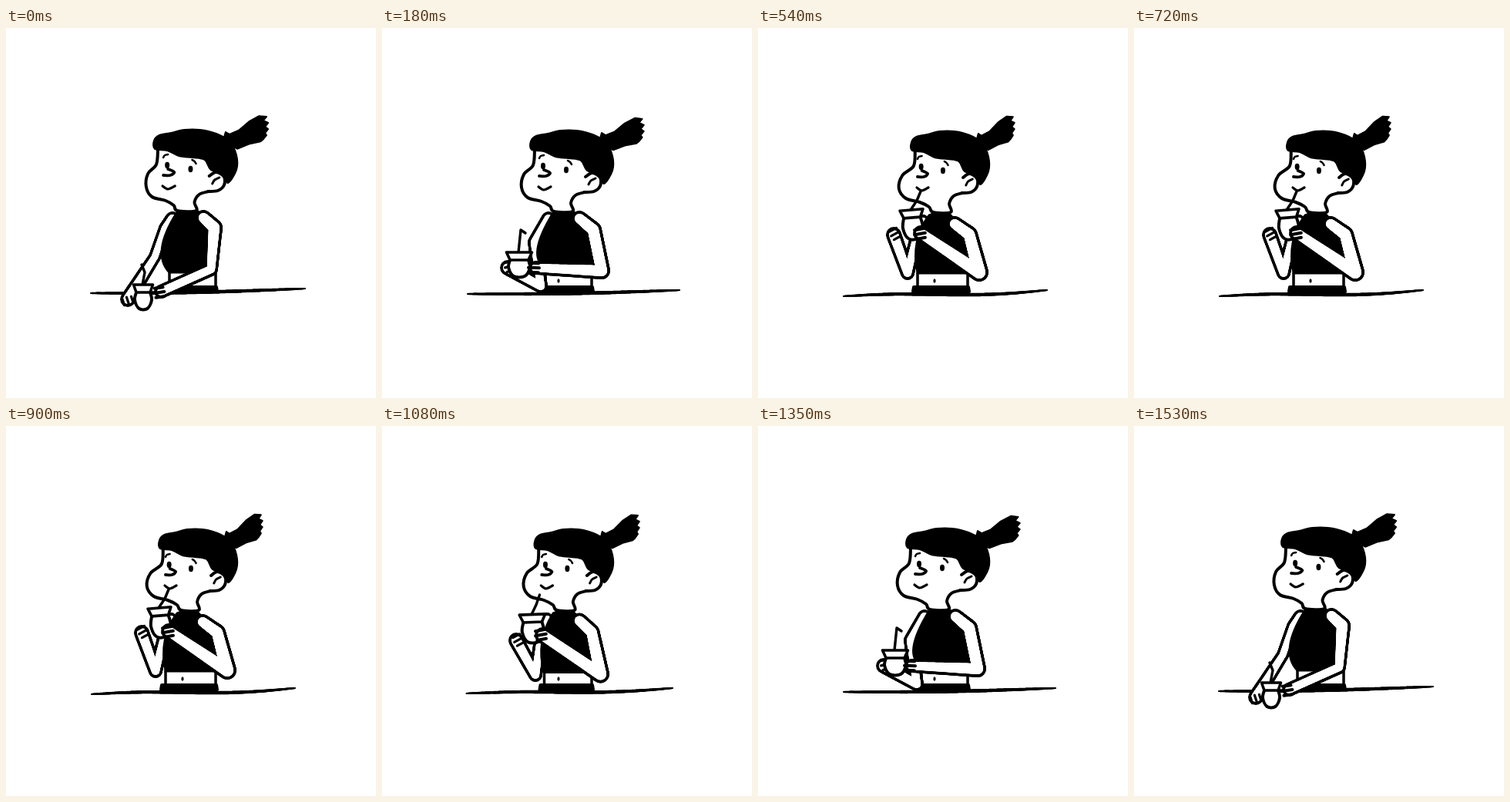
Write an HTML page with a canvas that moves like this. It is 480x480 px and loops after 1.62 s.

```html
<!DOCTYPE html>
<html lang="en">
<head>
<meta charset="utf-8">
<title>Sip</title>
<style>
html, body { margin: 0; width: 100%; height: 100%; overflow: hidden; background: #fff; }
canvas { display: block; width: 480px; height: 480px; }
</style>
</head>
<body>
<canvas id="stage"></canvas>
<script>
const STEP = 90;
const BLACK = '#000', WHITE = '#fff';

// Arms run shoulder, upper arm, elbow, hand as [x, y, radius].
// Fingers: x, y, angle, length. Cup: rim centre, rim width, depth, tilt.
const rest = {
  turn: -1, drop: -1, cheek: 2, pony: [0, -1], neck: 237,
  table: [110, 344, 388, 338, 0],
  right: [[256, 246, 8], [270, 259, 9], [266, 313, 7], [201, 342, 7]],
  left: [[216, 247, 7], [206, 260, 6], [193, 297, 6], [158, 352, 8]],
  rightFingers: [199, 343, -.14, 13], leftFingers: [158, 354, 1.25, 10],
  top: [212, 258, 317], bust: [188, 292],
  cup: [178, 333, 25, 33, 0], straw: [[180, 317], [176, 307]]
};
const lift = {
  turn: 0, drop: 0, cheek: 0, pony: [0, 1], neck: 238,
  table: [111, 345, 386, 340, 0],
  right: [[256, 247, 8], [274, 262, 9], [285, 315, 9], [199, 311, 7]],
  left: [[216, 247, 7], [198, 278, 7], [206, 335, 7], [163, 311, 8]],
  rightFingers: [197, 311, .03, 14], leftFingers: [163, 310, -.25, 7],
  top: [212, 272, 311], bust: [187, 297],
  cup: [178, 291, 33, 33, 0], straw: [[180, 262], [186, 266]]
};
const raise = {
  turn: 5, drop: 1, cheek: -2, pony: [-3, -1], neck: 241,
  table: [108, 346, 379, 340, 1],
  right: [[257, 251, 8], [270, 267, 8], [280, 327, 9], [206, 277, 9]],
  left: [[214, 250, 6], [208, 262, 6], [204, 328, 7], [172, 288, 8]],
  rightFingers: [202, 275, -.2, 14], leftFingers: [176, 288, -.5, 12],
  top: [214, 271, 321], bust: [200, 285],
  cup: [191, 253, 37, 36, 0], straw: [[194, 240], [198, 226]]
};
const sip = {
  turn: 6, drop: 1, cheek: -5, pony: [-5, -3], neck: 241,
  table: [111, 348, 375, 340, 2],
  right: [[255, 254, 8], [274, 268, 9], [287, 317, 10], [211, 266, 8]],
  left: [[214, 250, 6], [206, 268, 6], [194, 318, 7], [176, 268, 8]],
  rightFingers: [210, 267, -.18, 14], leftFingers: [178, 267, -.5, 12],
  top: [207, 272, 318], bust: [198, 275],
  cup: [199, 236, 30, 39, -.08], straw: [[206, 224], [211, 212]]
};
const POSES = [rest, lift, raise, sip];
// Fractions lie between two poses.
const TIMELINE = [0, .5, 1, 1.5, 2, 2.5, 3, 2.94, 3, 2.94, 3, 2.94, 2.5, 2, 1.5, 1, .5, 0];

const canvas = document.getElementById('stage');
const ctx = canvas.getContext('2d');
const dpr = window.devicePixelRatio || 1;
canvas.width = canvas.height = 480 * dpr;
ctx.scale(dpr, dpr);
ctx.lineCap = ctx.lineJoin = 'round';

const points = text => text.split(' ').map(p => p.split(',').map(Number));
const HAIR = points('194,158 193,147 200,140 215,137 232,133 252,133 273,138 290,148 299,166 299,185 288,202 282,190 266,185 258,172 242,169 225,167 210,160');
const FACE = points('198,158 196,178 184,190 181,207 189,220 207,225 218,231 223,238 247,238 245,227 251,217 263,213');
const EAR = points('264,193 273,188 283,194 283,205 275,212 263,213');
const PONY_ROOT = points('300,158 289,152 283,143 285,136 290,139 302,134 315,123 328,116');

function mix(a, b, k) {
  if (typeof a === 'number') return a + (b - a) * k;
  if (Array.isArray(a)) return a.map((v, i) => mix(v, b[i], k));
  return Object.fromEntries(Object.keys(a).map(key => [key, mix(a[key], b[key], k)]));
}

function poseAt(position) {
  const from = Math.min(POSES.length - 2, Math.floor(position));
  return mix(POSES[from], POSES[from + 1], position - from);
}

function paint(line, fill) {
  if (fill) {
    ctx.fillStyle = fill;
    ctx.fill();
  }
  ctx.lineWidth = line;
  ctx.stroke();
}

function polygon(pts, line, fill, closed = true) {
  ctx.beginPath();
  pts.forEach(p => ctx.lineTo(p[0], p[1]));
  if (closed) ctx.closePath();
  paint(line, fill);
}

// Smooth path through every point.
function curve(pts, line, fill, closed = false) {
  const n = pts.length;
  const at = i => closed ? pts[(i + n) % n] : pts[Math.max(0, Math.min(n - 1, i))];
  ctx.beginPath();
  ctx.moveTo(...pts[0]);
  for (let i = 0; i < (closed ? n : n - 1); i++) {
    const [a, b, c, d] = [at(i - 1), at(i), at(i + 1), at(i + 2)];
    ctx.bezierCurveTo(
      b[0] + (c[0] - a[0]) / 6, b[1] + (c[1] - a[1]) / 6,
      c[0] - (d[0] - b[0]) / 6, c[1] - (d[1] - b[1]) / 6, c[0], c[1]);
  }
  paint(line, fill);
}

function disc(x, y, rx, ry = rx, color = BLACK) {
  ctx.beginPath();
  ctx.ellipse(x, y, rx, ry, 0, 0, Math.PI * 2);
  ctx.fillStyle = color;
  ctx.fill();
}

// Tapered limb: a wide black sweep with a narrower white one inside.
function limb(joints) {
  for (const [color, grow] of [[BLACK, 1.9], [WHITE, -1.9]]) {
    for (let i = 1; i < joints.length; i++) {
      for (let k = 0; k <= 1; k += 1 / 80) {
        const [x, y, r] = mix(joints[i - 1], joints[i], k);
        disc(x, y, r + grow, r + grow, color);
      }
    }
  }
}

function fingers([x, y, angle, length], line) {
  const [c, s] = [Math.cos(angle), Math.sin(angle)];
  for (const side of [-6, 0, 6]) {
    const reach = length / 2 - Math.abs(side) / 6;
    const [mx, my] = [x - s * side, y + c * side];
    polygon([[mx - c * reach, my - s * reach], [mx + c * reach, my + s * reach]], line, null, false);
  }
}

function drawTable([x1, y1, x2, y2, wave]) {
  for (let k = 0; k <= 1; k += 1 / 400) {
    const y = mix(y1, y2, k) + 1.8 * Math.sin(Math.PI * k) - wave * Math.sin(Math.PI * 2 * k);
    disc(mix(x1, x2, k), y, 1 + 1.3 * Math.sqrt(Math.sin(Math.PI * k)));
  }
}

function drawBody({ top: [l, r, hem], bust, neck, right, left }) {
  polygon([[l, hem], [l, 336], [272, 336], [272, hem]], 3.5, WHITE, false);
  polygon([[l - 5, 336], [273, 336], [274, 342], [l - 6, 342]], 4, BLACK);
  disc(229, 328, 1.6, 2.8);
  limb(left);
  ctx.beginPath();
  ctx.moveTo(222, neck + 2);
  ctx.quadraticCurveTo(235, neck - 4, 248, neck);
  ctx.lineTo(right[1][0], right[1][1]);
  ctx.lineTo(r, hem);
  ctx.lineTo(l, hem);
  ctx.quadraticCurveTo(...bust, 222, neck + 2);
  paint(3, BLACK);
}

function drawHead({ turn, drop, cheek, pony }) {
  // Turning shifts the front of the head more than the back.
  const place = ([x, y], shift = 0) => [x + turn * (299 - x) / 105 + shift, y + drop];
  const feature = text => points(text).map(p => place(p, cheek / 2));
  const bulge = y => Math.max(0, Math.sin(Math.PI * (y - 178) / 56));

  curve(FACE.map(p => place(p, p[0] < 222 ? cheek * bulge(p[1]) : 0)), 4, WHITE);

  const tail = [...PONY_ROOT];
  for (let i = 0; i < 4; i++) {
    const bend = 4 * Math.sin(Math.PI * (i + .5) / 4);
    tail.push([336 + bend, 117 + 8 * i], [332 + bend, 122 + 8 * i]);
  }
  tail.push([330, 149], [315, 152]);
  const sway = x => Math.max(0, (x - 285) / 55);
  polygon(tail.map(([x, y]) => place([x + pony[0] * sway(x), y + pony[1] * sway(x)])), 2, BLACK);

  curve(HAIR.map(p => place(p)), 2, BLACK, true);
  curve(EAR.map(p => place(p)), 4, WHITE);
  curve(points('268,203 271,198 277,195').map(p => place(p)), 3);

  for (const eye of feature('209,179 239,184')) disc(...eye, 3, 4.2);
  curve(feature('204,169 206,166 210,165'), 2.5);
  curve(feature('241,172 244,174 246,177'), 2.5);
  curve(feature('210,184 218,188 213,192 204,192'), 3.8);
  curve(feature('203,206 210,210 219,206'), 3.2);
}

function drawCup({ cup: [x, y, width, depth, tilt], straw }) {
  polygon([[x - 1, y], ...straw], 3.4, null, false);
  ctx.save();
  ctx.translate(x, y);
  ctx.rotate(tilt);
  const [rim, neck] = [width / 2, width * .36];
  curve([[-neck, 10], [-neck - 2, depth * .6], [-neck * .6, depth - 2], [neck * .6, depth - 2], [neck + 2, depth * .6], [neck, 10]], 4, WHITE);
  polygon([[-rim, 0], [rim, 0], [neck, 10], [-neck, 10]], 3.6, WHITE);
  ctx.restore();
}

function draw(time) {
  const pose = poseAt(TIMELINE[Math.floor(time / STEP) % TIMELINE.length]);
  ctx.fillStyle = WHITE;
  ctx.fillRect(0, 0, 480, 480);
  ctx.strokeStyle = BLACK;
  drawTable(pose.table);
  drawBody(pose);
  drawHead(pose);
  fingers(pose.leftFingers, 3.2);
  drawCup(pose);
  limb(pose.right);
  fingers(pose.rightFingers, 4);
}

const start = performance.now();
function tick() {
  draw(Math.max(0, performance.now() - start));
  requestAnimationFrame(tick);
}
tick();
</script>
</body>
</html>
```
